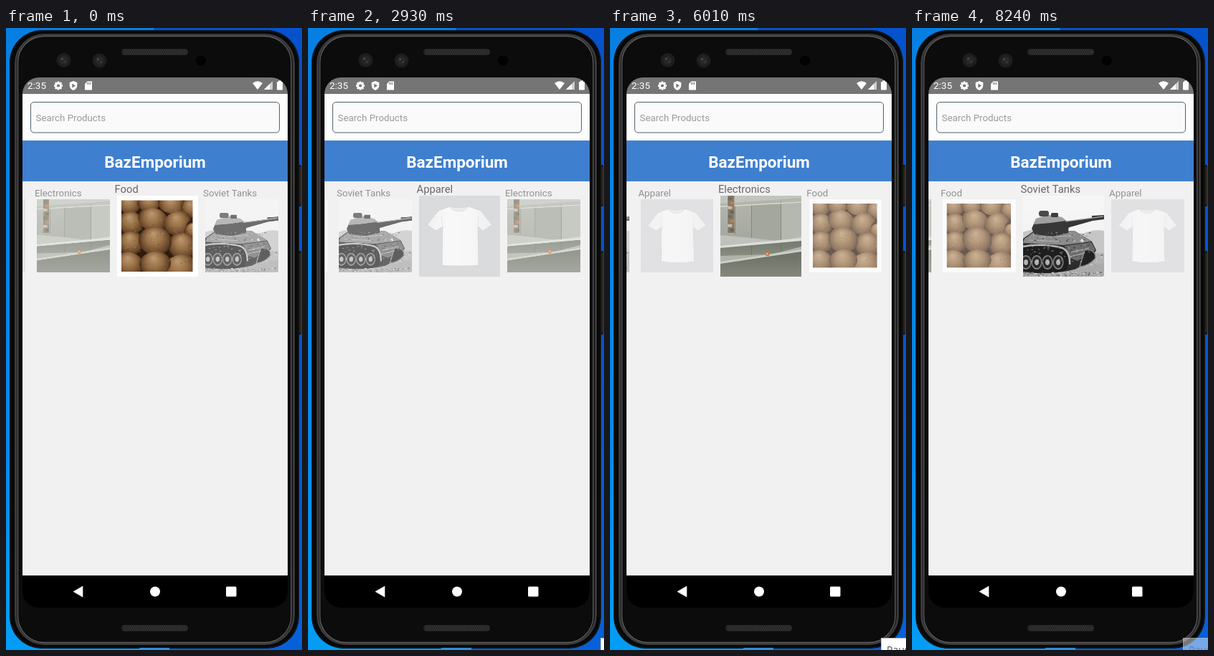
Write an HTML page with a canvas that moves like this. It is 413 px wide and 868 px high and loops after 8.31 s.

```html
<!DOCTYPE html>
<html lang="en">
<head>
<meta charset="utf-8">
<title>Category carousel</title>
<style>
html, body { margin: 0; width: 100%; height: 100%; overflow: hidden; background: #0a5fd0; }
canvas { display: block; }
</style>
</head>
<body>
<canvas id="stage" width="413" height="868"></canvas>
<script>
const W = 413, H = 868, LOOP = 8310, SIZE = 113, PITCH = 117.5;
const ctx = document.getElementById('stage').getContext('2d');

// Drawing helpers; g is any 2D context.
function rect(g, x, y, w, h, fill, r = 0) {
  g.fillStyle = fill;
  g.beginPath();
  g.roundRect(x, y, w, h, r);
  g.fill();
}
function outline(g, x, y, w, h, r, color, width = 1) {
  g.strokeStyle = color;
  g.lineWidth = width;
  g.beginPath();
  g.roundRect(x, y, w, h, r);
  g.stroke();
}
function oval(g, x, y, rx, ry, fill, turn = 0) {
  g.fillStyle = fill;
  g.beginPath();
  g.ellipse(x, y, rx, ry, turn, 0, 7);
  g.fill();
}
const disc = (g, x, y, r, fill) => oval(g, x, y, r, r, fill);
function shape(g, d, fill, stroke, width = 1) {
  const p = new Path2D(d);
  if (fill) { g.fillStyle = fill; g.fill(p); }
  if (stroke) { g.strokeStyle = stroke; g.lineWidth = width; g.stroke(p); }
}
function text(g, str, x, y, size, color, font = 'Roboto, sans-serif', weight = 400) {
  g.font = `${weight} ${size}px ${font}`;
  g.fillStyle = color;
  g.fillText(str, x, y);
}
function ramp(g, x0, y0, x1, y1, ...colors) {
  const grad = g.createLinearGradient(x0, y0, x1, y1);
  colors.forEach((c, i) => grad.addColorStop(i / (colors.length - 1), c));
  return grad;
}
function layer(w, h, scale, draw) {
  const c = document.createElement('canvas');
  c.width = w * scale;
  c.height = h * scale;
  const g = c.getContext('2d');
  g.scale(scale, scale);
  draw(g);
  return c;
}
function random(seed) {
  return () => (seed = (seed * 16807) % 2147483647) / 2147483647;
}
function speckle(g, n, x, y, w, h, colors, seed) {
  const rnd = random(seed);
  for (let i = 0; i < n; i++) {
    rect(g, x + rnd() * w, y + rnd() * h, 1 + rnd() * 2, .6 + rnd(), colors[i % colors.length]);
  }
}

function drawShelves(g) {
  rect(g, 0, 0, SIZE, SIZE, ramp(g, 0, 0, 0, 113, '#b6b8b0', '#a6a9a0', '#7d8076'));
  shape(g, 'M43 12H84V66L43 60Z', '#a4a79e');
  shape(g, 'M84 8L113 4V60L84 66Z', '#b5b8af');
  shape(g, 'M0 0H113V3L0 11Z', '#c2c5bd');
  shape(g, 'M20 13V54M43 12V60M84 8V66', null, '#83877d');
  shape(g, 'M0 15L113 9', null, '#d6d8d1', 1.6);
  shape(g, 'M0 55L43 59L84 64L113 56V60L0 70Z', '#bfc2ba');
  shape(g, 'M0 70L113 59V63L0 73Z', '#dcded7');
  shape(g, 'M0 73L113 63V76L0 92Z', ramp(g, 0, 64, 0, 92, '#757a6e', '#92968b'));
  shape(g, 'M43 69V84M84 66V79', null, '#6f7468');
  shape(g, 'M0 84L70 82L113 71V76L0 92Z', '#b0b3aa');
  shape(g, 'M0 92L113 75V78L0 95Z', '#cccfc6');
  shape(g, 'M0 95L113 78V113H0Z', ramp(g, 0, 80, 0, 113, '#6d7266', '#85887c'));
  rect(g, 10, 0, 9, 52, '#84796a');
  for (let i = 0; i < 8; i++) {
    rect(g, 10 + i % 2 * 3, 2 + i * 6.3, 6, 4, ['#66745a', '#b98058', '#c9bda5', '#76634f'][i % 4]);
  }
  rect(g, 63, 79, 5, 5, '#d0783c');
  rect(g, 64, 80, 2, 2, '#e9cba8');
}

function drawPotatoes(g) {
  rect(g, 0, 0, SIZE, SIZE, '#fff');
  g.save();
  g.beginPath();
  g.rect(6, 6.5, 99.5, 99.5);
  g.clip();
  rect(g, 6, 6, 100, 100, '#2e1b0e');
  const heap = [
    [17, 12, 16, 13, .2], [45, 9, 17, 12, -.2], [76, 12, 19, 13, .2], [104, 17, 15, 14, .5],
    [19, 38, 18, 16, .5], [50, 33, 21, 16, .3], [84, 38, 20, 16, -.4], [106, 50, 12, 18, .2],
    [19, 66, 18, 17, -.3], [91, 70, 20, 19, .4], [53, 63, 23, 20, .2],
    [17, 95, 20, 16, .3], [87, 100, 24, 17, -.3], [53, 95, 22, 17, -.1]
  ];
  for (const [x, y, rx, ry, turn] of heap) {
    const skin = g.createRadialGradient(x - rx * .1, y - ry * .5, 1, x, y, rx * 1.05);
    skin.addColorStop(0, '#ba966f');
    skin.addColorStop(.45, '#987047');
    skin.addColorStop(.8, '#69472a');
    skin.addColorStop(1, '#352011');
    oval(g, x, y, rx, ry, skin, turn);
  }
  speckle(g, 150, 6, 6, 99, 99, ['#5a391e55', '#c9a57a44'], 77);
  g.restore();
}

function drawTank(g) {
  rect(g, 0, 0, SIZE, SIZE, ramp(g, 0, 0, 0, 113, '#f7f7f7', '#f4f4f4', '#dedede'));
  shape(g, 'M0 51Q12 46 20 49L84 53Q99 46 113 49V85H0Z', '#c6c6c6');
  rect(g, 0, 80, SIZE, 33, '#b2b2b2');
  speckle(g, 220, 0, 80, 113, 33, ['#6a6a6a', '#dcdcdc', '#929292'], 19);
  shape(g, 'M0 60L14 50L72 49L96 64L102 76L92 93L66 106L0 106Z', '#2c2c2c');
  shape(g, 'M2 60L16 50L72 49L95 64L56 69L0 66Z', '#8c8c8c');
  shape(g, 'M58 70L95 65L101 76L76 91L62 86Z', '#6c6c6c');
  shape(g, 'M12 46L18 32L36 27L54 30L64 38L63 52L42 57L16 54Z', '#383838');
  shape(g, 'M18 32L36 27L54 30L60 35L38 38L15 40Z', '#a0a0a0');
  rect(g, 22, 21, 14, 8, '#4a4a4a', 3);
  rect(g, 39, 24, 10, 6, '#3c3c3c', 2);
  shape(g, 'M56 36L96 31V28L113 27V33L97 35L58 46Z', '#363636');
  shape(g, 'M59 36L112 29', null, '#a8a8a8', 1.2);
  shape(g, 'M0 72Q28 67 56 74Q67 83 61 103Q51 111 0 107Z', '#1e1e1e');
  shape(g, 'M0 71Q28 66 55 73Q66 79 65 96', null, '#b9b9b9', 2.5);
  for (const x of [4, 19, 34, 49]) {
    oval(g, x, 93, 7.5, 10, '#7e7e7e');
    oval(g, x, 93, 6, 8, '#2a2a2a');
    oval(g, x, 93, 3, 4, '#b4b4b4');
  }
  shape(g, 'M86 76Q101 74 101 87Q92 98 79 99Z', '#222', '#888', 1.5);
  shape(g, 'M67 79L92 73M66 85L86 80M8 62L53 64M25 58L70 56', null, '#b5b5b5');
  disc(g, 82, 63, 2.5, '#e4e4e4');
  speckle(g, 140, 5, 50, 88, 42, ['#1e1e1e88', '#d0d0d088'], 41);
  shape(g, 'M0 106Q30 111 62 105L113 94V113H0Z', '#aaa');
  speckle(g, 90, 0, 106, 113, 7, ['#555', '#d6d6d6', '#7a7a7a'], 8);
}

function drawShirt(g) {
  rect(g, 0, 0, SIZE, SIZE, '#dadbdd');
  shape(g, 'M43 15Q56 19 69 15L86 21L102 41L89 49L82 43L83 97Q58 99 32 97L33 43L24 49L11 41L27 21Z',
    ramp(g, 11, 0, 102, 0, '#f1f1f2', '#f9f9f9', '#f7f7f8', '#efeff0'), '#cfd0d2', .6);
  shape(g, 'M43 15Q56 19 69 15Q64 22 56 22Q47 22 43 15Z', '#ebebec', '#d6d7d9', .6);
  shape(g, 'M33 43L31 28M82 43L83 28', null, '#e3e3e5', .8);
}

const items = [
  ['Electronics', drawShelves], ['Food', drawPotatoes],
  ['Soviet Tanks', drawTank], ['Apparel', drawShirt]
].map(([title, draw]) => ({ title, photo: layer(SIZE, SIZE, 2, draw) }));

function speaker(g, y) {
  rect(g, 161, y, 93, 9, '#252525', 4.5);
  for (let x = 164; x < 252; x += 3) {
    for (let row = 0; row < 3; row++) rect(g, x + row % 2, y + 1.5 + row * 2.5, 1.3, 1.3, '#414141');
  }
}

function statusIcons(g) {
  g.save();
  g.translate(73, 80.5);
  for (let i = 0; i < 8; i++) {
    g.rotate(Math.PI / 4);
    rect(g, -1.5, -6, 3, 4, '#fff', .5);
  }
  disc(g, 0, 0, 4.6, '#fff');
  disc(g, 0, 0, 2.1, '#757575');
  g.restore();
  shape(g, 'M94 74L99.3 76V80Q99.3 85 94 87Q88.7 85 88.7 80V76Z', '#fff');
  shape(g, 'M92.3 77.5V83.5L97 80.5Z', '#757575');
  shape(g, 'M113.5 74.5H120V86.5H110V78Z', '#fff');
  shape(g, 'M113.5 76V79M115.5 76V79M117.5 76V79', null, '#757575');
  shape(g, 'M344 77Q351 71.5 358 77L351 86Z', '#fff');
  shape(g, 'M372 74V86H360Z', '#d0d0d0');
  shape(g, 'M368 78V86H360Z', '#fff');
  rect(g, 378, 75, 8, 11.5, '#fff', 1);
  rect(g, 380, 73.5, 4, 2, '#fff');
}

const phone = layer(W, H, 1, g => {
  rect(g, 0, 0, W / 2, H, ramp(g, 0, 0, 0, H, '#077fe2', '#0785e8', '#0789ec', '#049df6'));
  rect(g, W / 2, 0, W / 2 + 1, H, ramp(g, 0, 0, 0, H, '#0552cc', '#0555cf', '#0661d8'));

  rect(g, 406, 191, 6, 58, '#151515', 2);
  rect(g, 406, 311, 6, 117, '#151515', 2);
  shape(g, 'M410.5 194V246M410.5 314V425', null, '#3c3c3c');
  rect(g, 5, 3, 404, 863, '#080808', 45);
  outline(g, 6, 4, 402, 861, 44, '#1c1c1c');
  outline(g, 13.5, 9.5, 388, 850, 40, '#3a3a3a', 3);
  outline(g, 16.5, 11.5, 381.5, 846, 37, '#5a5a5a', 1.5);
  rect(g, 18, 13, 379, 843, '#0c0c0c', 36);
  rect(g, 186, 865, 42, 3, '#2f8fe0');
  speaker(g, 29);
  speaker(g, 833);
  for (const [x, y] of [[80.5, 45], [130.5, 45.5]]) {
    disc(g, x, y, 10, '#1e1e1f');
    disc(g, x, y, 6, '#272728');
    disc(g, x - 2, y - 2, 1.6, '#4b4b4c');
    disc(g, x + 2, y + 2, 1.5, '#3d3d3e');
  }
  disc(g, 272, 45.5, 7, '#020202');

  g.save();
  g.beginPath();
  g.roundRect(23, 69, 370, 740, 23);
  g.clip();
  rect(g, 23, 69, 370, 23, '#757575');
  rect(g, 23, 92, 370, 65, '#fdfdfd');
  rect(g, 23, 157, 370, 57, '#3f7fcf');
  rect(g, 23, 214, 370, 550, '#f1f1f1');
  rect(g, 23, 764, 370, 45, '#000');
  g.restore();

  text(g, '2:35', 30, 85, 13.5, '#fff');
  statusIcons(g);
  rect(g, 34.5, 103.5, 347, 42.5, '#fafafa', 4.5);
  outline(g, 34.5, 103.5, 347, 42.5, 4.5, '#53616b');
  text(g, 'Search Products', 41.5, 129.5, 13.3, '#9a9a9a');
  g.textAlign = 'center';
  text(g, 'BazEmporium', 208, 195, 22.5, '#fff', 'Roboto, sans-serif', 700);

  shape(g, 'M94 786.5L107 779V794Z', '#fff', '#fff', .6);
  disc(g, 208, 786.5, 7, '#fff');
  rect(g, 307, 779.5, 14.5, 14, '#fff', 1.5);
});

// Swipes: first step, last step, number of steps, easing.
const inOut = e => x => x < .5 ? .5 * (2 * x) ** e : 1 - .5 * (2 - 2 * x) ** e;
const release = x => 1 - (1 - x) ** 2.66;
const swipes = [
  [1050, 1260, 4, inOut(3)], [2730, 2930, 4, inOut(3)], [4330, 4900, 9, release],
  [6010, 6290, 5, inOut(5)], [7700, 7980, 5, inOut(2.7)]
];
function position(t) {
  return swipes.reduce((sum, [start, end, n, ease]) => {
    // The last step comes up to 10 ms late, so early ones get a little slack.
    const step = t < start ? 0 : Math.floor((t - start) / (end - start) * (n - 1) + .1) + 1;
    return sum + ease(Math.min(n, step) / n);
  }, 1);
}

function drawCarousel(pos) {
  ctx.save();
  ctx.beginPath();
  ctx.rect(23, 214, 370, 150);
  ctx.clip();
  for (let i = Math.floor(pos) - 2; i <= pos + 3; i++) {
    const { title, photo } = items[(i + 4) % 4];
    const away = Math.min(1, Math.abs(i - pos));
    ctx.save();
    ctx.translate(211.5 + (i - pos) * PITCH, 284);
    ctx.scale(1 - .1 * away, 1 - .1 * away);
    ctx.globalAlpha = 1 - .3 * away;
    text(ctx, title, -60, -54.3, 14.8, '#686868');
    ctx.drawImage(photo, -56.5, -50, SIZE, SIZE);
    ctx.restore();
  }
  ctx.restore();
}

function drawTooltip(t) {
  if (t < 1190) return;
  const x = t < 4680 ? 408 : 378;
  ctx.globalAlpha = t < 8240 ? 1 : .45;
  rect(ctx, x, 851, 60, 30, '#fff');
  outline(ctx, x + .5, 851.5, 60, 30, 0, '#b5b5b5');
  text(ctx, 'Pause', x + 8, 873, 14, '#505050', '"Open Sans", sans-serif');
  ctx.globalAlpha = 1;
}

function frame(now) {
  const t = now % LOOP;
  ctx.drawImage(phone, 0, 0);
  drawCarousel(position(t));
  drawTooltip(t);
}
const origin = performance.now();
function tick() {
  frame(performance.now() - origin);
  requestAnimationFrame(tick);
}
tick();
</script>
</body>
</html>
```
